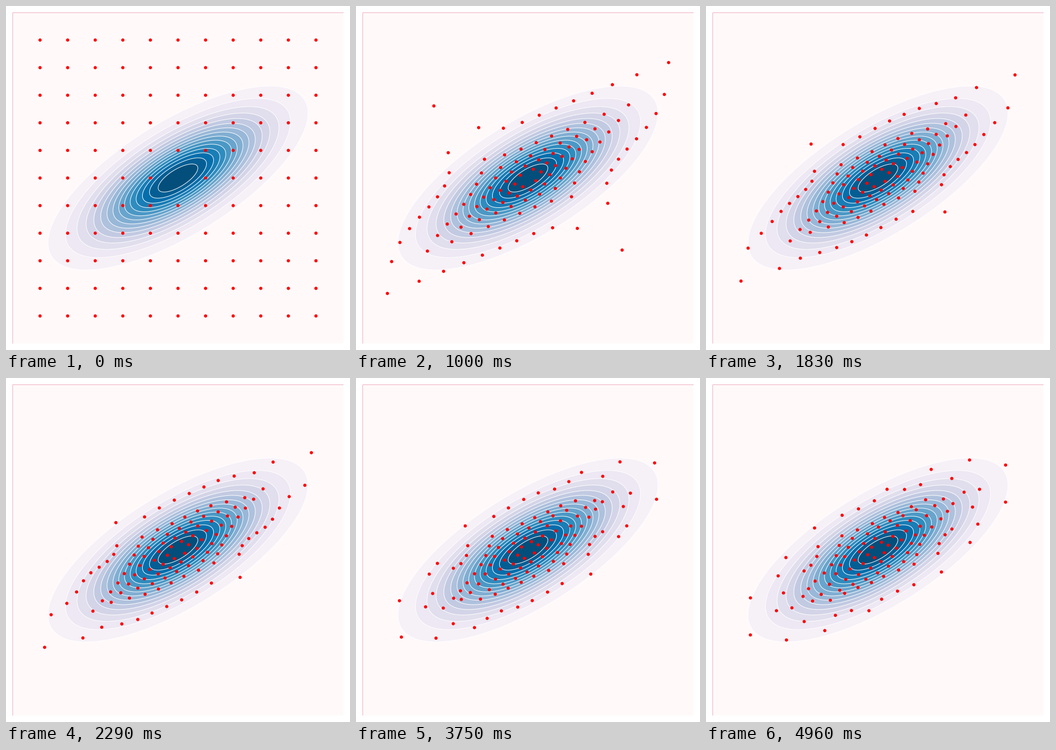
Animation of 639 by 639 pixels, one loop 5000 ms. Source, as a matplotlib script:

```python
import numpy as np
import matplotlib.pyplot as plt
from matplotlib.animation import FuncAnimation
from matplotlib.colors import LinearSegmentedColormap
from matplotlib.lines import Line2D
from matplotlib.patches import Polygon

SIZE, DPI, MARGIN = 639, 100, 12
FRAMES, LOOP_MS = 120, 5000
PX = 72 / DPI  # points per pixel

COV = np.array([[4.0, 2.0], [2.0, 2.0]])
PRECISION = np.linalg.inv(COV)
LEVELS = 16
TIME_SCALE = 0.0004

BACKGROUND = "#fff9fa"
PALETTE = ["#fff7fb", "#ece7f2", "#d0d1e6", "#a6bddb",
           "#74a9cf", "#3690c0", "#0570b0", "#034e7b"]
CMAP = LinearSegmentedColormap.from_list("blues", PALETTE, N=LEVELS)


def stein_force(x):
    """Stein variational gradient, Gaussian kernel, median bandwidth."""
    norm = (x ** 2).sum(axis=1)
    sq = np.maximum(norm[:, None] + norm[None, :] - 2 * x @ x.T, 0)
    var = np.median(sq) / (2 * np.log(len(x) + 1))
    k = np.exp(-sq / (2 * var))
    kx = k @ x
    drift = -kx @ PRECISION
    repulsion = (k.sum(axis=1, keepdims=True) * x - kx) / var
    return drift + repulsion


def rk4(x, h):
    a = stein_force(x)
    b = stein_force(x + h / 2 * a)
    c = stein_force(x + h / 2 * b)
    d = stein_force(x + h * c)
    return x + h / 6 * (a + 2 * b + 2 * c + d)


def flow_time(frame):
    return TIME_SCALE * frame ** 2


def particle_paths():
    grid = np.arange(-5.0, 6.0)
    x = np.array([(u, v) for v in grid for u in grid if u or v])
    paths = [x]
    for i in range(1, FRAMES):
        dt = flow_time(i) - flow_time(i - 1)
        steps = 2 + int(80 * dt)
        for _ in range(steps):
            x = rk4(x, dt / steps)
        x = (x - x[::-1]) / 2  # keep the point symmetry exact
        paths.append(x)
    return paths


def draw_density(ax):
    theta = np.linspace(0, 2 * np.pi, 361)
    ring = np.linalg.cholesky(COV) @ np.array([np.cos(theta), np.sin(theta)])
    for k in range(1, LEVELS):
        radius = np.sqrt(2 * np.log(LEVELS / k))
        ax.add_patch(Polygon(radius * ring.T, facecolor=CMAP(k),
                             edgecolor="white", linewidth=PX, zorder=1))


def draw_border(fig):
    lo, hi = (MARGIN + 0.5) / SIZE, (SIZE - MARGIN) / SIZE
    top = 1 - lo
    for xs, ys in (([lo, lo], [1 - hi, top]), ([lo, hi], [top, top])):
        fig.add_artist(Line2D(xs, ys, color="#efabc1", linewidth=PX,
                              solid_capstyle="butt", snap=False))


fig = plt.figure(figsize=(SIZE / DPI, SIZE / DPI), dpi=DPI, facecolor="white")
inset = MARGIN / SIZE
ax = fig.add_axes([inset, inset, 1 - 2 * inset, 1 - 2 * inset])
ax.set(xlim=(-6, 6), ylim=(-6, 6), xticks=[], yticks=[], facecolor=BACKGROUND)
for spine in ax.spines.values():
    spine.set_visible(False)

draw_density(ax)
draw_border(fig)

paths = particle_paths()
# One colour per dot keeps sub-pixel placement.
dots = ax.scatter(*paths[0].T, s=(6 * PX) ** 2, c=["red"] * len(paths[0]),
                  linewidths=0, zorder=2)


def update(frame):
    dots.set_offsets(paths[frame])
    return (dots,)


anim = FuncAnimation(fig, update, frames=FRAMES, interval=LOOP_MS / FRAMES,
                     repeat=True, repeat_delay=0, blit=False)
plt.show()
```
